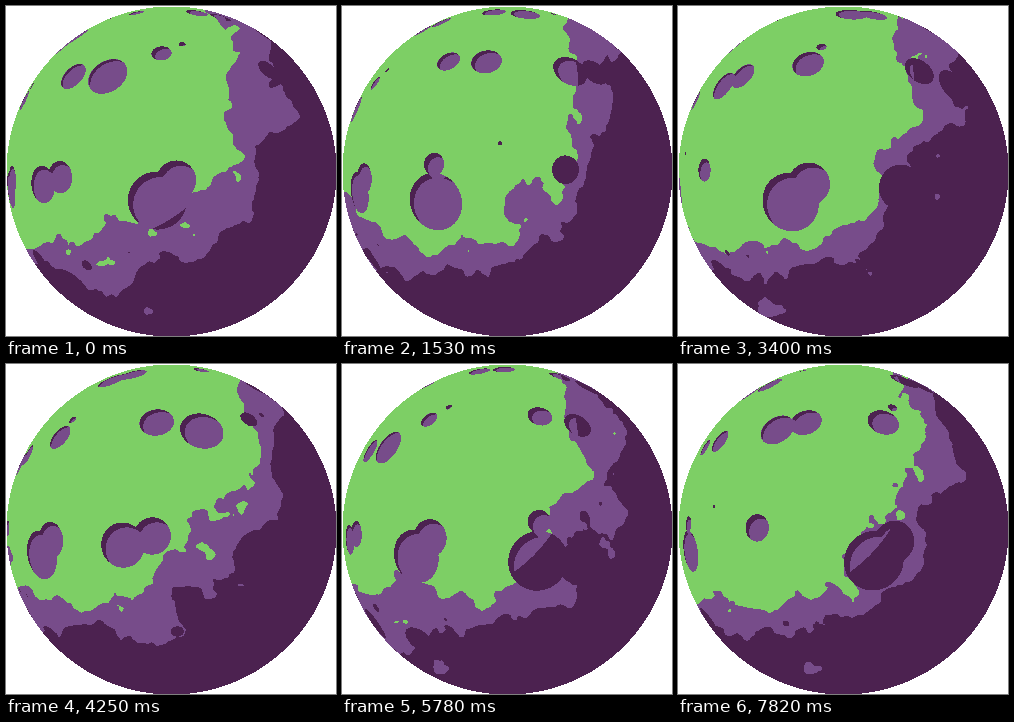
These frames come from a looping animation (330x330 px, 7990 ms). An HTML page with a canvas:

```html
<!DOCTYPE html>
<html lang="en">
<head>
<meta charset="utf-8">
<title>Rotating moon</title>
<style>
  html, body { margin: 0; width: 100%; height: 100%; overflow: hidden; background: #fff; }
  canvas { display: block; width: 100%; height: 100%; image-rendering: pixelated; }
</style>
</head>
<body>
<canvas id="moon" width="330" height="330"></canvas>
<script>
const SIZE = 330, FRAME_MS = 170, FRAMES = 47, FRAMES_PER_TURN = 30;
const SEED = 1.43, LIGHT = 0.25;
const GROUND_CELLS = 8, CRATER_CELLS = 5;
const MID_BORDER = 0.615, DARK_BORDER = 0.729, CRATER_BORDER = 0.465;

const rgb = (r, g, b) => (255 << 24 | b << 16 | g << 8 | r) >>> 0;
const BRIGHT = rgb(125, 207, 101), MID = rgb(119, 76, 138), DARK = rgb(76, 34, 80);

const ctx = document.getElementById('moon').getContext('2d');
const image = ctx.createImageData(SIZE, SIZE);
const pixels = new Uint32Array(image.data.buffer);

const fract = v => v - Math.floor(v);
const ease = v => v * v * (3 - 2 * v);

// A tiling grid of seeded random values.
function randomGrid(cells) {
  const grid = Array.from({ length: cells * cells }, (_, i) =>
    fract(Math.sin((i % cells) * 12.9898 + Math.floor(i / cells) * 78.233) * 15.5453 * SEED));
  return (x, y) => grid[(y % cells) * cells + x % cells];
}
const groundRandom = randomGrid(GROUND_CELLS);
const craterRandom = randomGrid(CRATER_CELLS);

function noise(x, y) {
  const ix = Math.floor(x), iy = Math.floor(y);
  const fx = ease(x - ix), fy = ease(y - iy);
  const a = groundRandom(ix, iy), b = groundRandom(ix + 1, iy);
  const c = groundRandom(ix, iy + 1), d = groundRandom(ix + 1, iy + 1);
  const top = a + (b - a) * fx, bottom = c + (d - c) * fx;
  return top + (bottom - top) * fy;
}

function fbm(x, y) {
  let value = 0;
  for (let k = 0, scale = 0.5; k < 4; k++, scale /= 2, x *= 2, y *= 2) {
    value += noise(x, y) * scale;
  }
  return value;
}

// 0 inside a circle, 1 outside, with a narrow ramp at its edge.
function circleNoise(x, y) {
  const row = Math.floor(y);
  x += row * 0.31;
  const col = Math.floor(x);
  const h = craterRandom(col, row), r = h * 0.25, centre = 0.25 + h * 0.5;
  const m = Math.hypot(x - col - centre, y - row - centre);
  if (m >= r) return 1;
  return ease(Math.max(0, (m - 0.9 * r) / (0.1 * r)));
}

function crater(u, v, turn) {
  const x = (u + turn) * CRATER_CELLS, y = v * CRATER_CELLS;
  return 1 - circleNoise(x + 11, y + 11) * circleNoise(x + 12, y + 12);
}

// Everything about a disc pixel that does not change with time.
const disc = [];
for (let i = 0; i < SIZE * SIZE; i++) {
  const x = (i % SIZE) / SIZE, y = Math.floor(i / SIZE) / SIZE;
  if (Math.hypot(x - 0.5, y - 0.5) > 0.49999) continue;
  const cx = x * 2 - 1, cy = y * 2 - 1;
  const depth = 1 + Math.sqrt(Math.max(0, 1 - cx * cx - cy * cy));
  const warp = fbm(x, y);
  disc.push({
    i,
    light: Math.hypot(x - LIGHT, y - LIGHT),
    gx: x * GROUND_CELLS + warp,
    gy: y * GROUND_CELLS + warp,
    u: cx / depth / 2 + 0.5,
    v: cy / depth / 2 + 0.5
  });
}

const RIM = (LIGHT - 0.5) * 0.03;

function shade(p, turn) {
  const c = crater(p.u, p.v, turn);
  if (c >= 0.5) {
    if (p.light > CRATER_BORDER) return DARK;
    const shifted = crater(p.u + RIM, p.v + RIM, turn);
    return shifted < c - (0.5 - p.light) * 2 ? DARK : MID;
  }
  const d = p.light + 0.3 * fbm(p.gx + turn * GROUND_CELLS, p.gy);
  return d > DARK_BORDER ? DARK : d > MID_BORDER ? MID : BRIGHT;
}

function draw(frame) {
  const turn = frame / FRAMES_PER_TURN;
  for (const p of disc) pixels[p.i] = shade(p, turn);
  ctx.putImageData(image, 0, 0);
}

const start = performance.now();
let shown = -1;
function tick() {
  const frame = Math.floor((performance.now() - start) / FRAME_MS) % FRAMES;
  if (frame !== shown) draw(shown = frame);
  requestAnimationFrame(tick);
}
tick();
</script>
</body>
</html>
```
